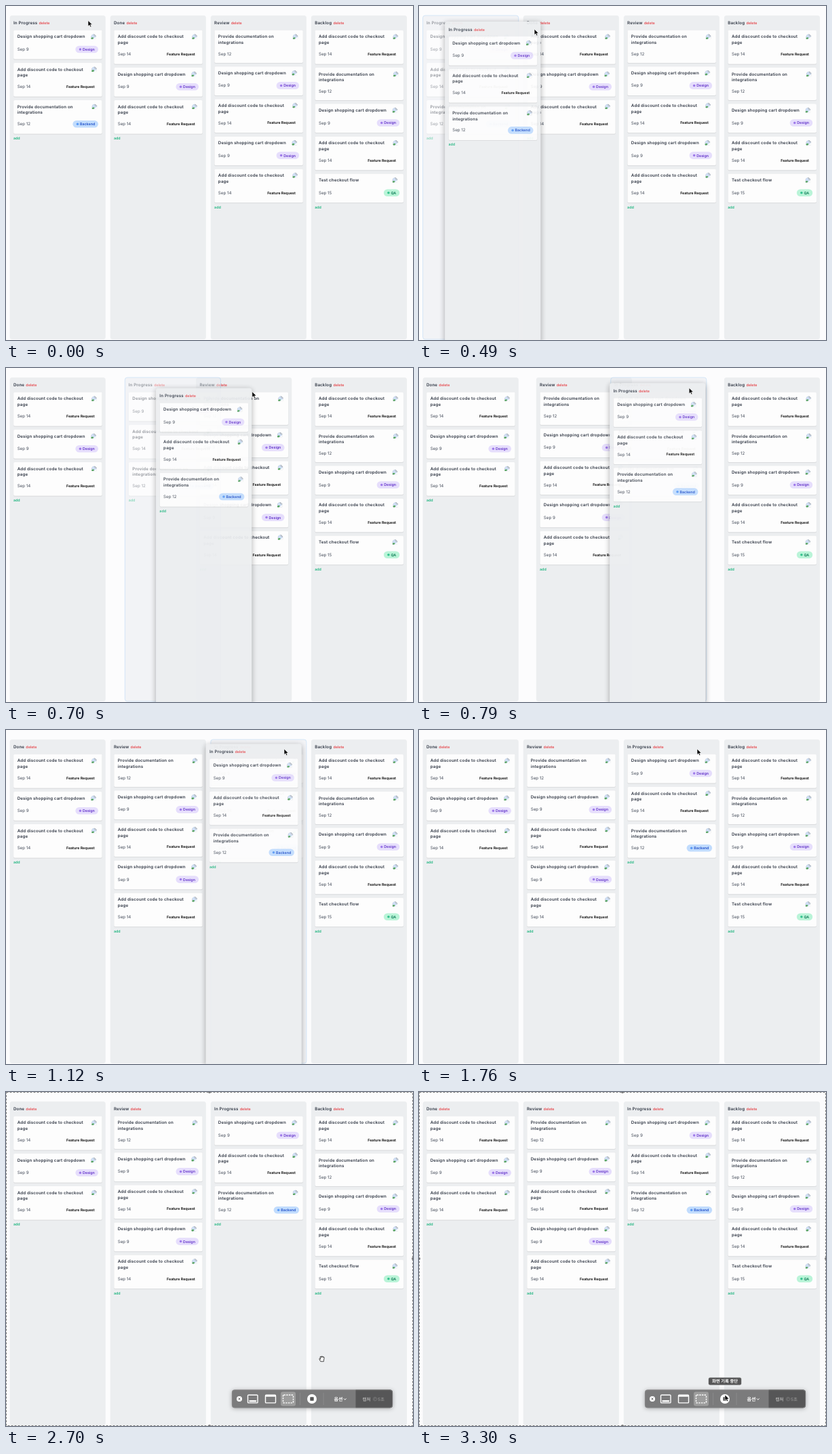
An HTML page that plays this animation: 600 px wide and 493 px high, repeating every 3330 ms.

```html
<!DOCTYPE html>
<html lang="en">
<head>
<meta charset="utf-8">
<title>Kanban board</title>
<style>
  html, body { margin: 0; width: 100%; height: 100%; overflow: hidden; background: #fcfcfd; }
  svg { display: block; width: 600px; height: 493px; }
  text { font-family: Inter, "Noto Sans CJK KR", "Noto Sans CJK", sans-serif; white-space: pre; text-rendering: geometricPrecision; }
  .title { font-size: 14px; font-weight: 600; letter-spacing: .35px; fill: #303744; }
  .small { font-size: 12px; font-weight: 600; letter-spacing: 0; }
  .date { font-size: 14px; fill: #414957; }
  .delete { fill: #e5484d; }
  .add { fill: #1fb57f; }
  .back { fill: #eceef0; }
  .card { fill: #fdfdfd; filter: drop-shadow(0 1px 1.5px rgba(0,0,0,.17)); }
  .ghost { opacity: .5; }
  .ghost .back { fill: #e9ecf0; stroke: #6fb0ee; stroke-width: 1.2; }
  #clone { opacity: .93; filter: drop-shadow(0 2px 4px rgba(0,0,0,.34)); }
  #tools text { font-size: 7px; font-weight: 600; }
</style>
</head>
<body>
<svg viewBox="0 0 600 493" xmlns="http://www.w3.org/2000/svg">
  <defs><clipPath id="disc"><circle cx="12" cy="12" r="12"/></clipPath></defs>
  <rect width="600" height="493" fill="#fcfcfd"/>
  <g id="board"></g>
  <g id="tools"></g>
  <path id="arrow" d="M0 0V8.4L2 6.6 3.3 9.6 4.8 9 3.5 6.1H6.2Z" stroke="#fff" stroke-width=".6"/>
  <path id="hand" d="M-2.2 4L-4 .8q-.6-1.2.6-1l1.1.9L-3-2.6q.2-1 1.1-.3l.5 1-.2-1.5q.4-1 1.2 0l.3 1.2.4-1.2q.8-.7 1.2.3v1.3l.7-.8q1-.2.9.9L2.4 3v1z"
    fill="#fff" stroke="#333" stroke-width=".9" stroke-linejoin="round"/>
</svg>
<script>
const LOOP = 3330;
const SCALE = .441, PITCH = 148.1, LEFT = 5.6, TOP = 14;
const DRAG_START = 360, DROP = 1250, TOOLS_AT = 1910, ARROW_AT = 2990, TIP_AT = 3180;
const SWAPS = [502, 675], SWAP_TIME = 200, DRAG_LAG = 28;
const GRAB = { x: 121, y: 21.5 };
const $ = id => document.getElementById(id);

// Board content; sizes inside a column are in its unscaled units.
const TAGS = {
  Design: { width: 76, fill: '#e6defc', dot: '#9f7aea', ink: '#5f2fc8' },
  Backend: { width: 85, fill: '#c1dcfd', dot: '#5b9bf5', ink: '#1f4fc9' },
  QA: { width: 53, fill: '#baf4d8', dot: '#34c38f', ink: '#0b7a55' },
  'Feature Request': { ink: '#000' }
};
const add = { lines: ['Add discount code to checkout', 'page'], date: 'Sep 14', tag: 'Feature Request', icon: 260 };
const design = { lines: ['Design shopping cart dropdown'], date: 'Sep 9', tag: 'Design', icon: 258 };
const provide = { lines: ['Provide documentation on', 'integrations'], date: 'Sep 12', icon: 261 };
const backend = { ...provide, tag: 'Backend' };
const flow = { lines: ['Test checkout flow'], date: 'Sep 15', tag: 'QA', icon: 258 };
const COLUMNS = {
  done: ['Done', [add, design, add]],
  review: ['Review', [provide, design, add, design, add]],
  backlog: ['Backlog', [add, provide, design, add, flow]],
  progress: ['In Progress', [design, add, backend]]
};

const rect = (x, y, w, h, r, attrs) =>
  `<rect x="${x}" y="${y}" width="${w}" height="${h}" rx="${r}" ${attrs}/>`;
const text = (x, y, str, attrs) => `<text x="${x}" y="${y}" ${attrs}>${str}</text>`;

function brokenImage(x) {
  return `<g transform="translate(${x} 12)" clip-path="url(#disc)">
    <path d="M1.5 1.5H12L17 6.5V17H1.5Z" fill="#cfdff5" stroke="#a3abb4"/>
    <path d="M1 17.5V15Q5 9.5 10 13L7 17.5Z" fill="#55a45c"/>
    <path d="M8 18L18 9.5V18Z" fill="#fdfdfd"/>
    <path d="M11.5 1.5V7H17Z" fill="#f3f5f7" stroke="#7c848e"/></g>`;
}

function tagBadge(name, cy) {
  const { width, fill, dot, ink } = TAGS[name];
  const label = `class="small" fill="${ink}"`;
  if (!fill) return text(271, cy + 4.3, name, label + ' text-anchor="end"');
  const x = 283 - width;
  return rect(x, cy - 12, width, 24, 12, `fill="${fill}"`) +
    `<circle cx="${x + 16}" cy="${cy}" r="4" fill="${dot}"/>` +
    text(x + 24, cy + 4.3, name, label);
}

function cardHeight({ lines, tag }) {
  return (lines.length > 1 ? 113 : 97) - (tag ? 0 : 4);
}

function card(c, y) {
  const cy = cardHeight(c) - (c.tag ? 33 : 30.5);
  return `<g transform="translate(12.5 ${y})">` +
    rect(0, 0, 296, cardHeight(c), 4, 'class="card"') +
    c.lines.map((line, i) => text(12.5, 26.4 + 20 * i, line, 'class="title"')).join('') +
    brokenImage(c.icon) + text(12.5, cy + 4.7, c.date, 'class="date"') +
    (c.tag ? tagBadge(c.tag, cy) : '') + '</g>';
}

function column(id, [name, cards]) {
  let y = 49.5;
  const list = cards.map(c => {
    const html = card(c, y);
    y += cardHeight(c) + 12;
    return html;
  }).join('');
  return `<g id="${id}"><g transform="scale(${SCALE})">` +
    rect(0, 0, 320, 1084, 8, 'class="back"') +
    text(12, 30.4, `${name}<tspan class="small delete" dx="5">delete</tspan>`, 'class="title"') +
    list + text(12, y + 7, 'add', 'class="small add"') + '</g></g>';
}

function toolbar() {
  const line = 'fill="none" stroke="#fff" stroke-width="1.4"';
  const handles = [[0, 246], [600, 246], [300, 0], [300, 493]]
    .map(([x, y]) => `<circle cx="${x}" cy="${y}" r="2" fill="#777"/>`).join('');
  const dividers = [433.5, 468]
    .map(x => `<path d="M${x} 444V462" stroke="#969696" stroke-width=".6"/>`).join('');
  return rect(.5, .5, 599, 492, 0, 'fill="none" stroke="#fff"') +
    rect(.5, .5, 599, 492, 0, 'fill="none" stroke="#777" stroke-dasharray="3 2"') + handles +
    rect(333, 439.5, 237, 26.8, 4, 'fill="#7b7b7c" style="filter:drop-shadow(0 1px 3px rgba(0,0,0,.3))"') +
    '<path d="M515.5 439.5H566a4 4 0 0 1 4 4V462.3a4 4 0 0 1-4 4H515.5Z" fill="#565657"/>' +
    rect(333.3, 439.8, 236.4, 26.2, 4, 'fill="none" stroke="#8e8e8e" stroke-width=".6"') +
    '<circle cx="344" cy="453" r="4" fill="#fff"/><path d="M342.5 451.5l3 3m0-3l-3 3" stroke="#666" stroke-width=".9"/>' +
    rect(356.5, 447.3, 14.5, 11.6, 1, line) + rect(358.5, 455, 10.5, 2.4, 0, 'fill="#fff"') +
    rect(382.5, 447.3, 15, 11.6, 1, line) + rect(382.5, 447, 15, 2.8, 1, 'fill="#fff"') +
    rect(405, 442.5, 22, 21, 3, 'fill="#9d9d9d"') +
    rect(408.5, 447.3, 15, 11.6, 1, line + ' stroke-dasharray="2.4 1.3"') + dividers +
    '<circle cx="451" cy="453" r="7" fill="#fff"/>' + rect(448.3, 450.3, 5.4, 5.4, .6, 'fill="#555"') +
    text(483.5, 455.6, '옵션', 'fill="#fff"') +
    '<path d="M497.8 452.4l1.9 1.9 1.9-1.9" fill="none" stroke="#fff" stroke-width="1"/>' +
    text(525.5, 455.6, '캡처', 'fill="#b0b0b0" style="font-size:6.4px"') +
    '<g fill="none" stroke="#8c8c8c" stroke-width=".6"><circle cx="544" cy="453.2" r="2.6"/><path d="M544 451.2V453.4H542.6"/></g>' +
    text(548, 455.6, '5초', 'fill="#8c8c8c" style="font-size:6.4px"') +
    '<g id="tip">' + rect(427, 421.7, 48, 10.6, 2, 'fill="#565657" stroke="#777" stroke-width=".5"') +
    text(451, 429.4, '화면 기록 중단', 'fill="#fff" text-anchor="middle" style="font-size:6.3px"') + '</g>';
}

$('board').innerHTML = Object.entries(COLUMNS).map(([id, data]) => column(id, data)).join('') +
  column('clone', COLUMNS.progress);
$('tools').innerHTML = toolbar();

// Pointer path as [time, x, y].
const PATH = [
  [300, 121, 21.5], [400, 128, 23], [500, 176, 35], [610, 270.5, 41], [700, 362, 35],
  [760, 395.5, 30], [790, 398, 29.5], [860, 409, 28], [930, 410, 28], [2050, 410, 28],
  [2130, 411, 34], [2350, 438, 210], [2560, 464, 378], [2650, 466, 394], [2740, 466, 394.5],
  [2970, 461, 430], [3140, 451, 447], [3250, 451, 447]
];

function slope(i, k) {
  const a = PATH[i - 1], b = PATH[i], c = PATH[i + 1];
  if (!a || !c || (b[k] - a[k]) * (c[k] - b[k]) <= 0) return 0;
  return (c[k] - a[k]) / (c[0] - a[0]);
}

function pointer(t) {
  const last = PATH.length - 1;
  const i = PATH.findIndex(p => p[0] > t) - 1;
  if (t < PATH[0][0]) return { x: PATH[0][1], y: PATH[0][2] };
  if (t >= PATH[last][0]) return { x: PATH[last][1], y: PATH[last][2] };
  const a = PATH[i], b = PATH[i + 1], span = b[0] - a[0], u = (t - a[0]) / span;
  const blend = k => {
    const s = u * u * (3 - 2 * u);
    return a[k] + (b[k] - a[k]) * s +
      span * u * (1 - u) * ((1 - u) * slope(i, k) - u * slope(i + 1, k));
  };
  return { x: blend(1), y: blend(2) };
}

// CSS "ease": cubic-bezier(.25, .1, .25, 1)
function ease(p) {
  if (p <= 0) return 0;
  if (p >= 1) return 1;
  const bez = (u, a, b) => 3 * u * (1 - u) ** 2 * a + 3 * u * u * (1 - u) * b + u ** 3;
  let lo = 0, hi = 1;
  for (let n = 0; n < 20; n++) {
    const mid = (lo + hi) / 2;
    if (bez(mid, .25, .25) < p) lo = mid; else hi = mid;
  }
  return bez(lo, .1, 1);
}

const move = (id, x, y) => $(id).setAttribute('transform', `translate(${x.toFixed(2)} ${y.toFixed(2)})`);
const show = (id, on) => { $(id).style.display = on ? '' : 'none'; };
const place = (id, slot) => move(id, LEFT + PITCH * slot, TOP);

function render(t) {
  const [first, second] = SWAPS.map(at => ease((t - at) / SWAP_TIME));
  place('progress', first + second);
  place('done', 1 - first);
  place('review', 2 - second);
  place('backlog', 3);

  const dragging = t >= DRAG_START && t < DROP;
  $('progress').classList.toggle('ghost', dragging);
  show('clone', dragging);
  const held = pointer(t - DRAG_LAG);
  move('clone', LEFT + held.x - GRAB.x, TOP + held.y - GRAB.y);

  show('tools', t >= TOOLS_AT);
  show('tip', t >= TIP_AT);
  const grabbing = t >= TOOLS_AT && t < ARROW_AT;
  const { x, y } = pointer(t);
  show('hand', grabbing);
  show('arrow', !grabbing);
  move('hand', x, y);
  move('arrow', x, y);
}

const start = performance.now();
function tick() {
  render((performance.now() - start) % LOOP);
  requestAnimationFrame(tick);
}
tick();
</script>
</body>
</html>
```
